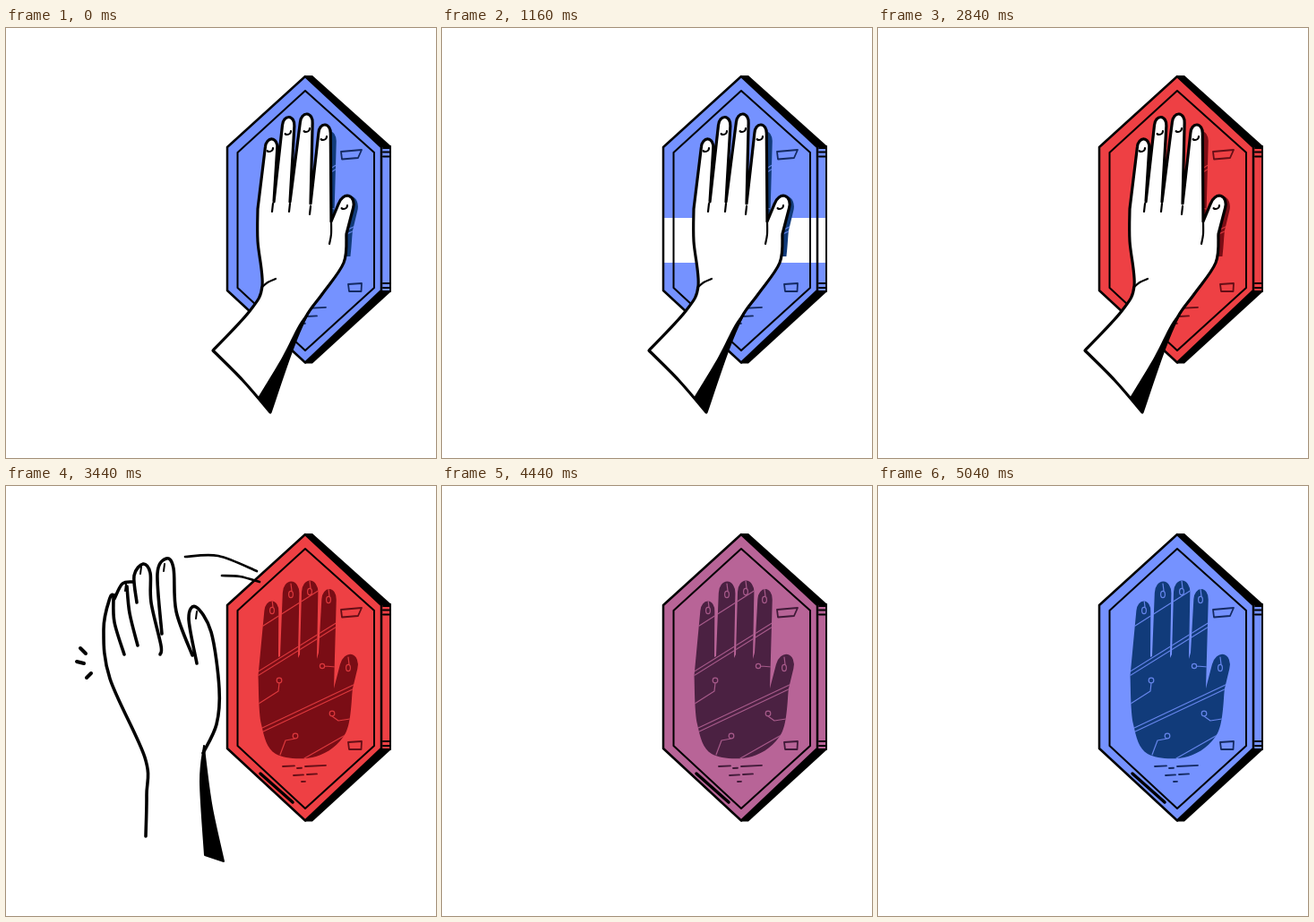
An HTML page with a canvas that plays this animation: 480 by 480 pixels, repeating every 5.08 s.

```html
<!DOCTYPE html>
<html lang="en">
<head>
<meta charset="utf-8">
<title>Palm scanner</title>
<style>
html, body { margin: 0; width: 100%; height: 100%; overflow: hidden; background: #fff; }
canvas { display: block; width: 100vw; height: 100vh; }
</style>
</head>
<body>
<canvas id="stage" width="480" height="480"></canvas>
<script>
const ctx = document.getElementById('stage').getContext('2d');
const LOOP = 5080;
const INK = '#000';
const PAPER = '#fff';

const BLUE = { fill: [117, 146, 255], dark: [17, 59, 122], mark: [20, 42, 98] };
const RED = { fill: [238, 64, 68], dark: [122, 13, 21], mark: [100, 14, 22] };

// Continues the path through the points x, y, x, y, ... as a smooth curve.
function curveTo(path, ...p) {
  const last = p.length / 2 - 1;
  const at = (i, axis) => p[Math.max(0, Math.min(last, i)) * 2 + axis];
  path.lineTo(p[0], p[1]);
  for (let i = 0; i < last; i++) {
    const c = [0, 1].map(k => [
      at(i, k) + (at(i + 1, k) - at(i - 1, k)) / 6,
      at(i + 1, k) - (at(i + 2, k) - at(i, k)) / 6,
      at(i + 1, k)
    ]);
    path.bezierCurveTo(c[0][0], c[1][0], c[0][1], c[1][1], c[0][2], c[1][2]);
  }
}

function curve(path, ...p) {
  path.moveTo(p[0], p[1]);
  curveTo(path, ...p);
}

function polygon(...p) {
  const path = new Path2D();
  for (let i = 0; i < p.length; i += 2) path.lineTo(p[i], p[i + 1]);
  path.closePath();
  return path;
}

function hexagon(left, right, top, bottom, y1, y2) {
  return polygon(334, top, right, y1, right, y2, 334, bottom, left, y2, left, y1);
}

// A finger from its left root over a round tip to its right root.
function finger(path, x0, y0, tipX, tipY, r, x1, y1) {
  const lean = Math.atan2(tipX - (x0 + x1) / 2, (y0 + y1) / 2 - tipY);
  const long = r * 1.4;
  path.lineTo(x0, y0);
  path.ellipse(tipX - Math.sin(lean) * long, tipY + Math.cos(lean) * long, r, long, lean, Math.PI, 2 * Math.PI);
  path.lineTo(x1, y1);
}

function segment(path, x0, y0, x1, y1) {
  path.moveTo(x0, y0);
  path.lineTo(x1, y1);
}

function ring(path, x, y, rx, ry = rx) {
  path.moveTo(x + rx, y);
  path.ellipse(x, y, rx, ry, 0, 0, 2 * Math.PI);
}

function stroke(path, color, width) {
  ctx.strokeStyle = color;
  ctx.lineWidth = width;
  ctx.stroke(path);
}

function fill(path, color) {
  ctx.fillStyle = color;
  ctx.fill(path);
}

function clipped(region, paint) {
  ctx.save();
  ctx.clip(region);
  paint();
  ctx.restore();
}

// Panel
const face = hexagon(247, 419, 54, 373.5, 133, 293);
const rim = hexagon(258.5, 411, 70, 360, 139, 290);
const block = polygon(334, 53, 342, 53, 430, 132, 430, 294, 342, 374.5, 334, 374.5);
const side = new Path2D();
side.rect(419, 132, 10, 162);
const body = new Path2D(face);
body.addPath(side);

const notches = new Path2D();
for (const y of [134, 138.5, 143.5, 285, 290]) segment(notches, 421, y, 428, y);
const scuff = new Path2D();
segment(scuff, 284, 321, 320, 353);

const marks = polygon(374, 138, 397, 136, 393, 145, 375, 146.5);
marks.addPath(polygon(382, 286, 397, 285, 396.5, 294, 383, 294));
for (const [x, y, w] of [[309, 313, 13], [325, 315, 5], [334, 313, 23], [321, 323, 11], [336, 322, 11], [330, 330, 4]])
  segment(marks, x, y, x + w, y - w / 20);

// Palm print
const print = new Path2D();
finger(print, 281.5, 212, 297, 128.5, 8, 304, 191);
finger(print, 306, 190, 318.5, 106.5, 9.3, 326, 192);
finger(print, 328, 188, 339.5, 105.5, 9.2, 347, 193);
finger(print, 349, 186, 361, 115, 8.2, 366, 226);
finger(print, 367, 222, 386, 188, 10, 387, 226);
curveTo(print, 387, 226, 379, 276, 346, 302, 301, 299, 285, 266, 281.5, 212);

const circuit = new Path2D();
segment(circuit, 284, 158, 350, 116);
for (const gap of [0, 4.5]) {
  segment(circuit, 280, 208 + gap, 370, 152 + gap);
  segment(circuit, 284, 271 + gap, 390, 221 + gap);
}
segment(circuit, 333, 304, 384, 275);
segment(circuit, 356, 201, 368, 202);
for (const [x, y, bendX, bendY, endX, endY] of [
  [305, 217, 304, 229, 282, 243], [364, 254, 371, 262, 384, 260], [323, 279, 312, 284, 306, 300]
]) {
  ring(circuit, x, y, 2.8);
  segment(circuit, x, y + 3, bendX, bendY);
  circuit.lineTo(endX, endY);
}
ring(circuit, 353, 201, 2.6);
for (const [x, y] of [[297, 139], [318, 121], [339, 118], [360, 127], [382, 203]]) {
  ring(circuit, x, y, 2.4, 3.6);
  segment(circuit, x + 1, y - 4, x, y - 12);
}

// Pressing hand
const press = new Path2D();
finger(press, 281, 202, 297, 124, 6.7, 299, 194);
finger(press, 299, 194, 316, 99.5, 6.7, 317, 194);
finger(press, 317, 194, 336, 96, 6.9, 340, 196);
finger(press, 340, 196, 356, 108, 6.7, 363, 216);
finger(press, 363, 216, 383, 187.5, 8.5, 380, 230);
curveTo(press, 380, 230, 377, 262, 353, 297, 335, 322, 318, 362, 295, 429);
curveTo(press, 295, 429, 264, 393, 231, 360);
curveTo(press, 231, 360, 272, 316, 286, 288, 281, 238, 281, 202);
press.closePath();

const creases = new Path2D();
curve(creases, 285, 290, 292, 284, 301, 280);
curve(creases, 363, 215, 363, 230, 361, 241);
for (const [x, y] of [[298, 196], [317, 196], [340, 199]]) segment(creases, x, y, x - 1, y + 9);
for (const [x, y] of [[294, 134], [314, 115], [335, 112], [354, 121], [377, 198]]) {
  creases.moveTo(x + 4, y);
  creases.ellipse(x, y, 4, 4, 0, 0, Math.PI * 0.7);
}

const pressShade = new Path2D();
curveTo(pressShade, 341, 313, 327, 331, 308, 368, 281, 413);
curveTo(pressShade, 295, 429, 318, 362, 341, 313);

// Lifted hand
const lifted = new Path2D();
curve(lifted, 121, 122, 116, 125, 109, 160, 116, 215, 155, 303, 157, 345, 156, 391);
curve(lifted, 120, 124, 121, 152, 132, 188);
curve(lifted, 121, 126, 130, 109, 143, 107);
curve(lifted, 135, 112, 138, 142, 147, 178);
curve(lifted, 146, 130, 143, 100, 153, 87, 161, 97, 162, 130, 173, 178, 172, 188);
curve(lifted, 174, 165, 169, 98, 179, 81, 187, 92, 190, 140, 208, 189);
curve(lifted, 213, 198, 204, 148, 212, 135, 229, 163, 238, 226, 235, 266, 220, 298);

const liftedNails = new Path2D();
for (const [x, y] of [[151, 94], [177, 91], [213, 144], [134, 113]]) segment(liftedNails, x, y - 4, x - 1, y + 4);

const liftedShade = new Path2D();
curveTo(liftedShade, 221, 290, 217, 330, 222, 412);
curveTo(liftedShade, 243, 419, 230, 360, 223, 310, 221, 290);

const swish = new Path2D();
curve(swish, 200, 79, 237, 78, 280, 95);
curve(swish, 241, 100, 261, 101, 283, 107);
const flicks = new Path2D();
segment(flicks, 83, 181, 89, 187);
segment(flicks, 79, 196, 87, 198);
segment(flicks, 90, 214, 95, 209);

const rgb = c => 'rgb(' + c.map(Math.round).join() + ')';
const blend = (a, b, t) => a.map((v, i) => v + (b[i] - v) * t);

// Only the edge of the print on the thumb side shows beside a pressing hand.
const shadowEdge = new Path2D();
shadowEdge.rect(357, 110, 45, 145);
const whole = new Path2D();
whole.rect(0, 0, 480, 480);

function drawPanel(blueness, bandY, pressed) {
  const [base, dark, mark] = ['fill', 'dark', 'mark'].map(k => rgb(blend(RED[k], BLUE[k], blueness)));
  fill(block, INK);
  fill(body, base);
  if (bandY) clipped(body, () => {
    ctx.fillStyle = PAPER;
    ctx.fillRect(240, bandY, 195, 50);
  });
  clipped(pressed ? shadowEdge : whole, () => {
    fill(print, dark);
    clipped(print, () => {
      ctx.globalAlpha = 0.85;
      stroke(circuit, base, 1.2);
    });
  });
  stroke(marks, mark, 1.8);
  stroke(side, INK, 2);
  stroke(notches, INK, 2);
  stroke(scuff, INK, 3.5);
  stroke(face, INK, 2.5);
  stroke(rim, INK, 2);
}

function drawPress() {
  fill(press, PAPER);
  fill(pressShade, INK);
  stroke(press, INK, 3.2);
  stroke(creases, INK, 2.2);
}

function drawLifted() {
  stroke(lifted, INK, 3.6);
  stroke(liftedNails, INK, 2);
  fill(liftedShade, INK);
  stroke(liftedShade, INK, 2);
  stroke(swish, INK, 2.7);
  stroke(flicks, INK, 4);
}

function draw(t) {
  const scanning = t >= 600 && t < 2840;
  const bandY = scanning ? Math.min(162 + 50 * Math.floor((t - 600) / 560), 303) : 0;
  let blueness = t < 2840 ? 1 : 0;
  if (t >= 4000) blueness = Math.min(1, (Math.floor((t - 4000) / 40) + 1) / 27);

  ctx.fillStyle = PAPER;
  ctx.fillRect(0, 0, 480, 480);
  ctx.lineJoin = ctx.lineCap = 'round';
  drawPanel(blueness, bandY, t < 3440);
  if (t < 3440) drawPress();
  else if (t < 4000) drawLifted();
}

const start = performance.now();
function tick(now) {
  draw(Math.max(0, now - start) % LOOP);
  requestAnimationFrame(tick);
}
draw(0);
requestAnimationFrame(tick);
</script>
</body>
</html>
```
